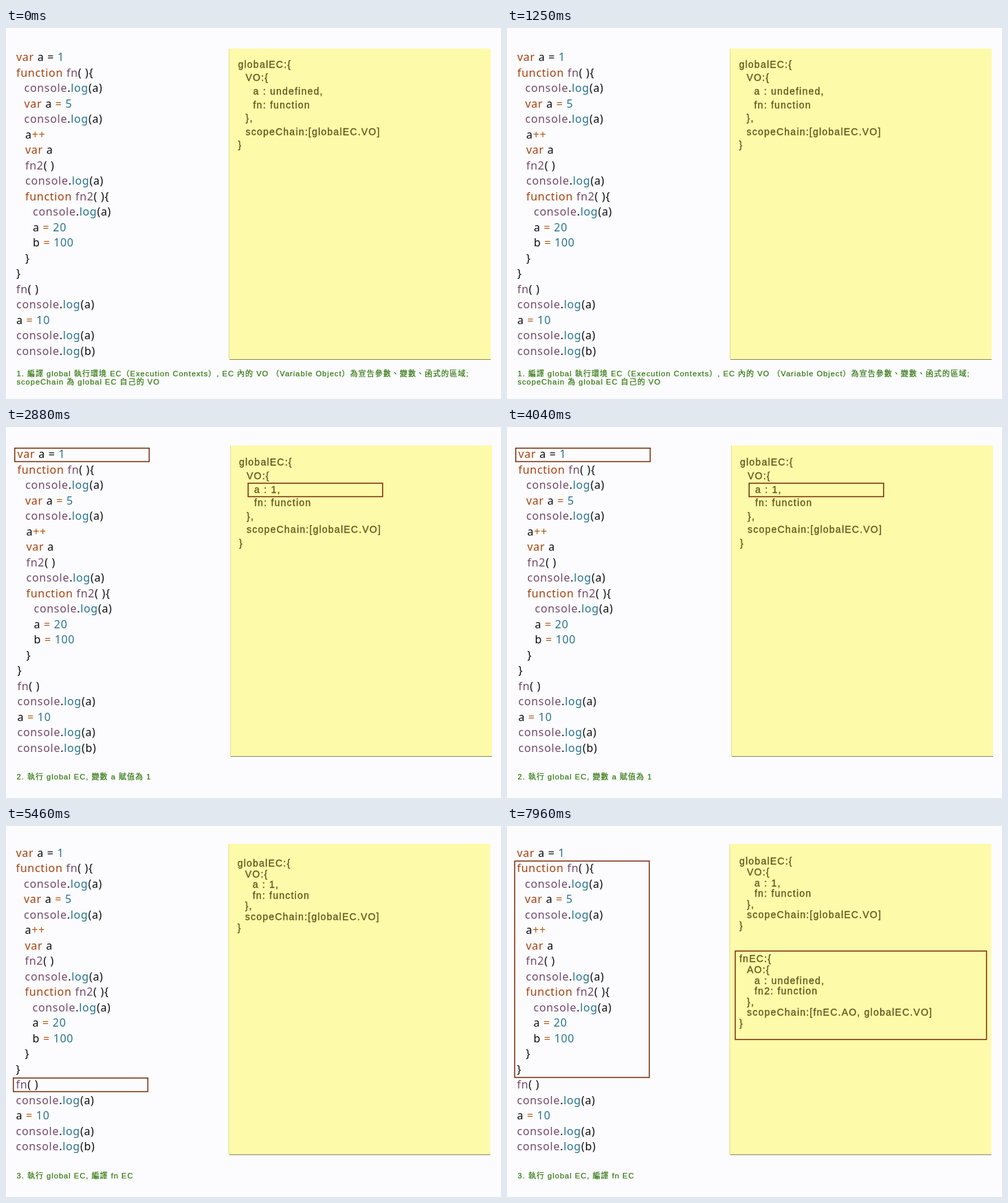
An HTML page that plays this animation: 720 by 540 pixels, repeating every 8000 ms.

```html
<!DOCTYPE html>
<html lang="zh-Hant">
<head>
<meta charset="utf-8">
<title>Execution contexts</title>
<style>
  html, body { margin: 0; width: 100%; height: 100%; overflow: hidden; background: #fcfcfe; }
  svg { display: block; width: 720px; height: 540px; }
  text { white-space: pre; }
  .code { font: 16px "Noto Sans", sans-serif; letter-spacing: .7px; fill: #0c0c0c; }
  .keyword { fill: #a8400c; }
  .name { fill: #74496a; }
  .value { fill: #28738f; }
  .operator { fill: #b4560f; }
  .context, .caption { font-family: "Liberation Sans", "Noto Sans CJK TC", "Noto Sans CJK", "Noto Sans CJK JP", sans-serif; }
  .context { font-size: 14px; letter-spacing: 1.23px; fill: #5c5618; stroke: #5c5618; stroke-width: .3px; }
  .caption { font-size: 11px; letter-spacing: 1.05px; fill: #2a7206; stroke: #2a7206; stroke-width: .2px; }
  .box { fill: none; stroke: #78300e; stroke-width: 1.5px; }
</style>
</head>
<body>
<svg id="stage" viewBox="0 0 720 540"></svg>
<script>
const LOOP = 8000;

// Each entry: horizontal indent, then the line of code.
const CODE = [
  [0, 'var a = 1'], [0, 'function fn( ){'],
  [11.5, 'console.log(a)'], [11.5, 'var a = 5'], [11.5, 'console.log(a)'],
  [13, 'a++'], [13, 'var a'], [13, 'fn2( )'], [13, 'console.log(a)'], [13, 'function fn2( ){'],
  [24, 'console.log(a)'], [24, 'a = 20'], [24, 'b = 100'],
  [13, '}'], [0, '}'], [0, 'fn( )'], [0, 'console.log(a)'],
  [0, 'a = 10'], [0, 'console.log(a)'], [0, 'console.log(b)']
];
const TOKENS = /(?<keyword>var|function)|(?<name>fn2?|console)|(?<value>log|\d+)|(?<operator>=|\+\+)/g;

const context = (name, record, a, fn, chain) => [
  [0, `${name}:{`], [1, `${record}:{`], [2, `a : ${a},`], [2, `${fn}: function`],
  [1, '},'], [1, `scopeChain:[${chain}]`], [0, '}']
];
const globalContext = a => context('globalEC', 'VO', a, 'fn', 'globalEC.VO');
const fnContext = context('fnEC', 'AO', 'undefined', 'fn2', 'fnEC.AO, globalEC.VO');

const text = (cls, x, y, content) => `<text class="${cls}" x="${x}" y="${y}">${content}</text>`;
const box = ([x, y, w, h]) => `<rect class="box" x="${x}" y="${y}" width="${w}" height="${h}"/>`;

function highlight(line, row) {
  return line.replace(TOKENS, (token, ...rest) => {
    const groups = rest.at(-1);
    const kind = Object.keys(groups).find(key => groups[key]);
    // The first assignment sign stays plain.
    return row === 0 && kind === 'operator' ? token : `<tspan class="${kind}">${token}</tspan>`;
  });
}

const codeBlock = (x, y) =>
  CODE.map(([indent, line], row) => text('code', x + indent, y + row * 22.5, highlight(line, row))).join('');

const contextBlock = ({ x, y, pitch, lines }) =>
  lines.map(([level, line], row) => text('context', x + level * 11, y + row * pitch, line)).join('');

const panel = (x, y) => `
  <rect x="${x}" y="${y}" width="381" height="452" fill="#fdfaaa"/>
  <path d="M${x + .5} ${y}v452" stroke="#dedca0"/>
  <path d="M${x + 1} ${y + 452.5}h380" stroke="#8c8a66"/>`;

const SLIDES = [
  {
    start: 0, code: [15, 48], panel: [324, 30],
    contexts: [{ x: 337.5, y: 57.8, pitch: 19.6, lines: globalContext('undefined') }],
    boxes: [],
    caption: [[507, '1. 編譯 global 執行環境 EC（Execution Contexts）, EC 內的 VO （Variable Object）為宣告參數、變數、函式的區域;'],
      [519, 'scopeChain 為 global EC 自己的 VO']]
  },
  {
    start: 2040, code: [16.5, 45.4], panel: [326, 27],
    contexts: [{ x: 339, y: 56.3, pitch: 19.6, lines: globalContext('1') }],
    boxes: [[12.7, 30.8, 195.6, 19.6], [352.2, 81.8, 195.6, 19.6]],
    caption: [[513, '2. 執行 global EC, 變數 a 賦值為 1']]
  },
  {
    start: 4080, code: [14.5, 44.6], panel: [323.5, 26],
    contexts: [{ x: 336.7, y: 59, pitch: 15.6, lines: globalContext('1') }],
    boxes: [[10.7, 366.8, 195.6, 19.8]],
    caption: [[513, '3. 執行 global EC, 編譯 fn EC']]
  },
  {
    start: 6120, code: [14.5, 44.6], panel: [323.5, 26],
    contexts: [
      { x: 338, y: 56.2, pitch: 15.65, lines: globalContext('1') },
      { x: 338, y: 198.2, pitch: 15.65, lines: fnContext }
    ],
    boxes: [[11.2, 51, 195.8, 315], [332, 182, 365.5, 128.7]],
    caption: [[513, '3. 執行 global EC, 編譯 fn EC']]
  }
];

const stage = document.getElementById('stage');
stage.innerHTML = SLIDES.map(slide => `<g>
  ${codeBlock(...slide.code)}
  ${panel(...slide.panel)}
  ${slide.contexts.map(contextBlock).join('')}
  ${slide.boxes.map(box).join('')}
  ${slide.caption.map(([y, line]) => text('caption', 15.5, y, line)).join('')}
</g>`).join('');

const groups = [...stage.children];
const begin = performance.now();

function render(now) {
  const time = Math.max(0, now - begin) % LOOP;
  const current = SLIDES.findLastIndex(slide => slide.start <= time);
  groups.forEach((group, i) => group.style.display = i === current ? '' : 'none');
  requestAnimationFrame(render);
}
render(begin);
</script>
</body>
</html>
```
